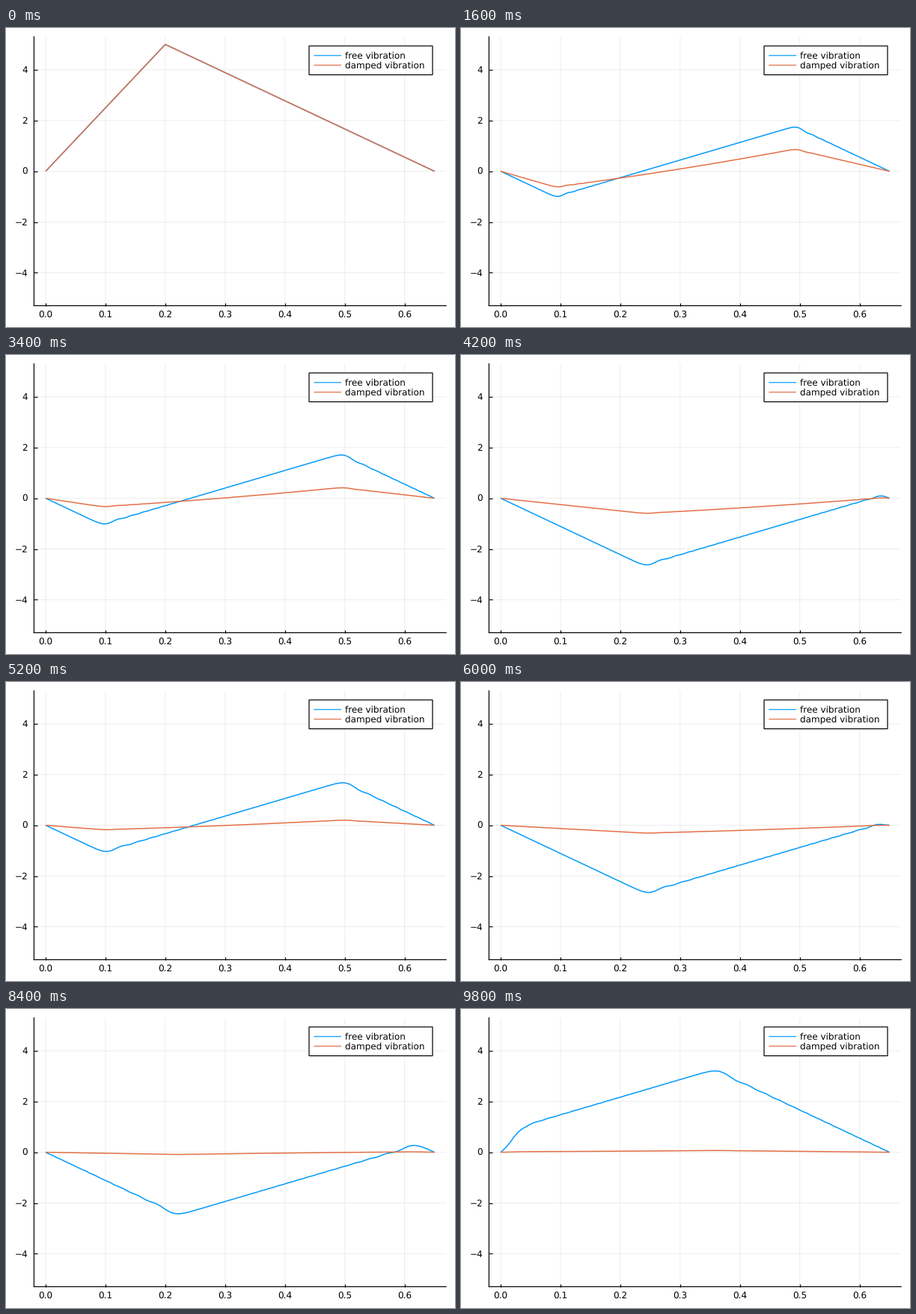
Write a matplotlib script that moves like this. It is 600 by 400 pixels and loops after 10 s.

```python
import numpy as np
import matplotlib.pyplot as plt
from matplotlib.animation import FuncAnimation
from matplotlib.patches import Rectangle

plt.rcParams.update({
    "font.family": "DejaVu Sans",
    "text.hinting": "none",
    "lines.solid_capstyle": "butt",
    "path.simplify": False,
    "path.snap": False,
})

W, H, DPI = 600, 400, 100
PX = 72 / DPI                       # points per pixel
BLUE, ORANGE = "#009AFA", "#E36F47"
LEFT, RIGHT, TOP, BOTTOM = 37.4, 588.2, 11.8, 371.5

# Plucked string on a grid
LENGTH, PLUCK, HEIGHT = 0.65, 0.2, 5.0
CELLS = 650
SPEED = 0.28864                     # distance a wave runs per frame
DECAY = 0.0755                      # amplitude decay rate per frame
SUBSTEPS = 1000
FRAMES, INTERVAL = 50, 200

x = np.linspace(0, LENGTH, CELLS + 1)
dx = LENGTH / CELLS
start = np.interp(x, [0, PLUCK, LENGTH], [0, HEIGHT, 0])

# Sine modes with the dispersion of a leapfrog scheme
k = np.arange(1, CELLS) * np.pi / LENGTH
modes = np.sin(np.outer(x, k))
coef = 2 / CELLS * (start @ modes)
courant = SPEED / SUBSTEPS / dx
omega = 2 * SUBSTEPS * np.arcsin(courant * np.sin(k * dx / 2))
omega_damped = np.sqrt(omega**2 - DECAY**2)


def free(t):
    return modes @ (coef * np.cos(omega * t))


def damped(t):
    phase = omega_damped * t
    swing = np.cos(phase) + DECAY / omega_damped * np.sin(phase)
    return np.exp(-DECAY * t) * (modes @ (coef * swing))


fig = plt.figure(figsize=(W / DPI, H / DPI), dpi=DPI, facecolor="white")

ax = fig.add_axes([LEFT / W, 1 - BOTTOM / H,
                   (RIGHT - LEFT) / W, (BOTTOM - TOP) / H])
ax.set_xlim(-0.03 * LENGTH, 1.03 * LENGTH)
ax.set_ylim(-5.3, 5.3)
xticks = np.arange(7) / 10
yticks = np.arange(-4, 5, 2)
ax.set_xticks(xticks)
ax.set_yticks(yticks)
ax.tick_params(direction="in", length=4.5 * PX, width=1.2 * PX,
               labelbottom=False, labelleft=False)
ax.grid(color="black", alpha=0.07, linewidth=1 * PX)
ax.set_axisbelow(True)
for side in ("top", "right"):
    ax.spines[side].set_visible(False)
for side in ("left", "bottom"):
    ax.spines[side].set_linewidth(1.2 * PX)

free_line, = ax.plot(x, start, color=BLUE, lw=1.5 * PX, zorder=3)
damped_line, = ax.plot(x, start, color=ORANGE, lw=1.5 * PX, zorder=4)

# Labels and legend in pixel coordinates
page = fig.add_axes([0, 0, 1, 1], zorder=2)
page.set_xlim(0, W)
page.set_ylim(H, 0)
page.axis("off")


def label(px, py, text, align):
    page.text(px, py, text, fontsize=12 * PX, color="black",
              ha=align, va="baseline")


def to_page(px, py):
    return page.transData.inverted().transform(ax.transData.transform((px, py)))


for v in xticks:
    label(to_page(v, 0)[0], 387.6, f"{v:.1f}", "center")
for v in yticks:
    label(29, to_page(0, v)[1] + 4.4, str(v).replace("-", "\u2212"), "right")

page.add_patch(Rectangle((405, 24), 165, 38.6, facecolor="white",
                         edgecolor="black", linewidth=1.2 * PX))
for row, (name, color) in enumerate([("free vibration", BLUE),
                                     ("damped vibration", ORANGE)]):
    y = 36.8 + 12.9 * row
    page.plot([411.3, 448], [y, y], color=color, lw=1.2 * PX)
    label(453, y + 4.2, name, "left")


def update(i):
    free_line.set_ydata(free(i))
    damped_line.set_ydata(damped(i))
    return free_line, damped_line


anim = FuncAnimation(fig, update, frames=FRAMES, interval=INTERVAL,
                     init_func=lambda: update(0), repeat=True, repeat_delay=0)
plt.show()
```
